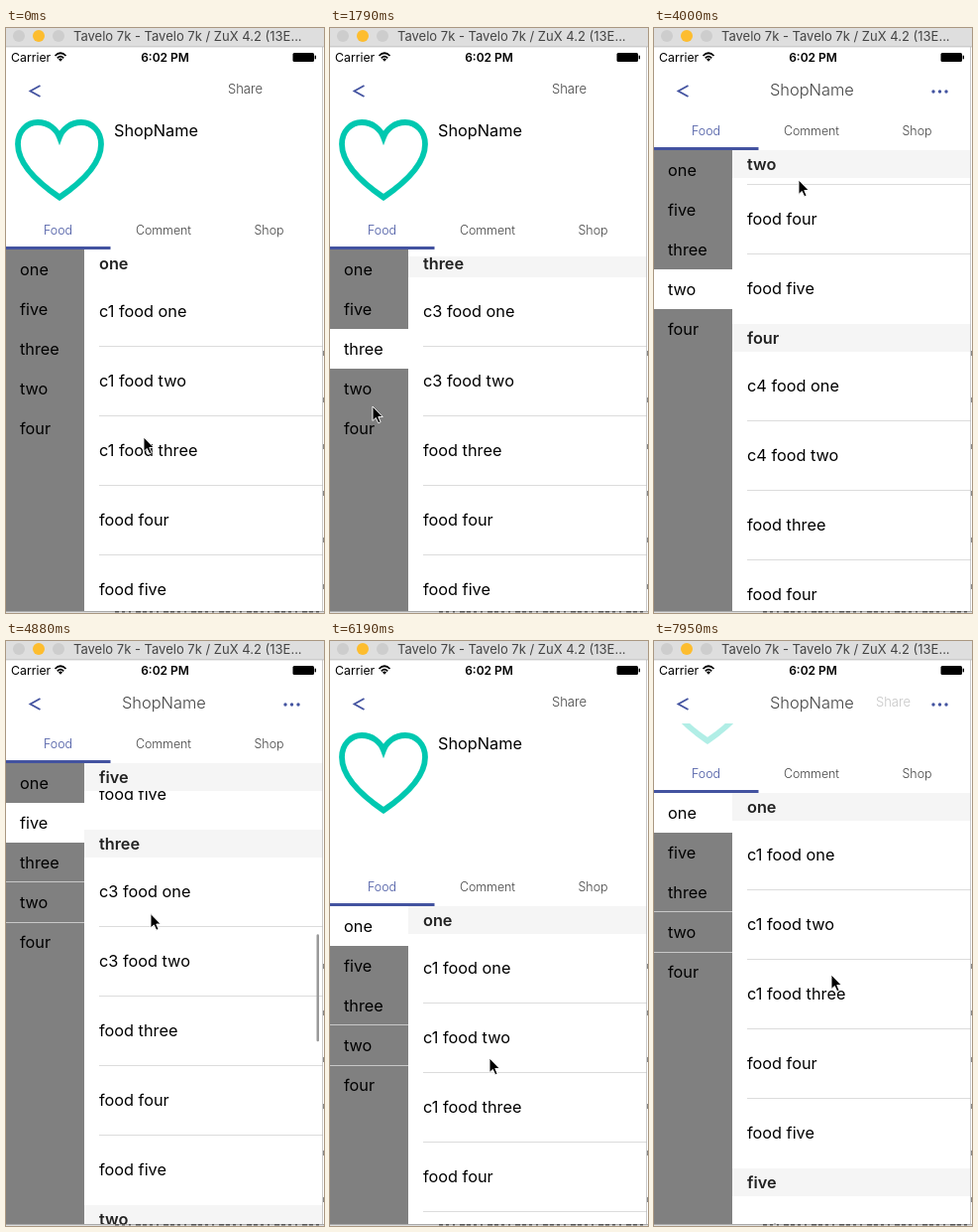
Write an HTML page that moves like this. It is 321 px wide and 589 px high and loops after 8 s.

```html
<!DOCTYPE html>
<html lang="en">
<head>
<meta charset="utf-8">
<title>Shop menu</title>
<style>
html, body { margin: 0; width: 100%; height: 100%; overflow: hidden; background: #fff; }
svg { display: block; font-family: Inter, Roboto, sans-serif; font-size: 16.3px; }
.bold { font-weight: 600; fill: #222; }
.light { font-weight: 300; fill: #444; }
</style>
</head>
<body>
<svg id="stage" width="321" height="589" viewBox="0 0 321 589"></svg>
<script>
const LOOP = 8000, STEP = 147, DRAG_END = 4000, RESUME = 4420;
const SECTION = 378, HEAD = 28, ROW = 70, BOTTOM = 587;
const BLUE = '#4353a0';
const sections = ['one', 'five', 'three', 'two', 'four'];
const words = ['one', 'two', 'three', 'four', 'five'];
const taps = [600, 1480, 1940];

const clamp = (v, lo, hi) => Math.min(hi, Math.max(lo, v));
const smooth = u => u * u * (3 - 2 * u);
const ramp = (t, from, to) => clamp((t - from) / (to - from), 0, 1);

// The screen refreshes in steps and rests between the two drags.
function refreshTime(t) {
  if (t < 150) return 0;
  const base = t < RESUME ? 150 : RESUME;
  const shown = t < RESUME ? Math.min(t, DRAG_END) : t;
  return base + Math.floor((shown - base) / STEP) * STEP;
}

// Position of every moving part at time t
function pose(t) {
  const collapse = ramp(t, 2480, 3480);
  const dragList = ramp(t, 3480, 3970);
  const fling = ramp(t, RESUME, 5320);
  const expand = ramp(t, 5300, 5533);
  const pull = ramp(t, 5550, 6180);
  const release = ramp(t, 6190, 6500);
  const push = ramp(t, 6900, 7940);
  const toMenu = ramp(t, 150, 600);
  const toList = ramp(t, 2200, 2480);
  const bounce = ramp(t, 5320, 5440) - ramp(t, 5450, 5590);

  const jumps = taps.reduce((sum, tap) => sum + smooth(ramp(t, tap, tap + 260)), 0);
  return {
    shift: Math.round(100 * (expand - collapse) + 44 * (pull - release) - 70 * push),
    scroll: Math.round(SECTION * jumps + 203 * dragList - 1337 * smooth(fling) - 4 * bounce),
    x: 139 - 96 * toMenu + 103 * toList + 15 * pull + 18 * push,
    y: 412 - 127 * toMenu + 96 * ramp(t, 1200, 1760) + 69 * toList - 100 * collapse
      - 197 * dragList + 281 * ramp(t, RESUME, 5440) - 14 * pull - 84 * push
  };
}

const rect = (x, y, w, h, fill, more = '') =>
  `<rect x="${x}" y="${y}" width="${w}" height="${h}" fill="${fill}" ${more}/>`;
const dot = (x, y, r, fill) => `<circle cx="${x}" cy="${y}" r="${r}" fill="${fill}"/>`;
const text = (x, y, str, more = '') => `<text x="${x}" y="${y}" ${more}>${str}</text>`;

function rowName(section, i) {
  const prefixed = i < (section === 'one' ? 3 : 2);
  return (prefixed ? `c${words.indexOf(section) + 1} ` : '') + 'food ' + words[i];
}

function selected(t, scroll) {
  if (t >= RESUME) return clamp(Math.floor(scroll / SECTION), 0, 4);
  return taps.filter(tap => tap <= t).length || -1;
}

function list(t, top, scroll) {
  const blank = t < 150 ? HEAD : t < 2350 ? 7 : 0;
  let rows = '', heads = '';
  sections.forEach((name, s) => {
    const y = top + s * SECTION - scroll;
    if (y > BOTTOM || y + SECTION < top) return;
    for (let i = 0; i < 5; i++) {
      const rowY = y + HEAD + i * ROW;
      rows += text(94, rowY + 40, rowName(name, i));
      if (i < 4) rows += rect(94, rowY + ROW - 1, 226, 1, '#dcdcdc');
    }
    const headY = clamp(top, y, y + SECTION - HEAD);
    heads += rect(79, headY, 241, HEAD, '#f5f5f5') + rect(79, top, 241, blank, '#fff')
      + text(94, headY + 20, name, 'class="bold"');
  });
  const barY = top + 3 + Math.max(0, scroll) / (5 * SECTION) * (BOTTOM - top);
  if (t > RESUME && t < 5590) rows += rect(313.5, barY, 2.5, 108, '#999', 'rx="1.25"');
  return `<clipPath id="listBox">${rect(79, top, 241, BOTTOM - top, '#000')}</clipPath>
    <g clip-path="url(#listBox)">${rows}${heads}</g>`;
}

function menu(t, top, sel) {
  let out = rect(0, top, 79, BOTTOM - top, '#808080');
  if (sel >= 0) out += rect(0, top + sel * 40, 79, 40, '#fff');
  if (t >= RESUME && sel < 3) out += rect(0, top + 119, 79, 1, '#c8c8c8') + rect(0, top + 160, 79, 1, '#c8c8c8');
  return out + sections.map((name, i) => text(14, top + 26 + i * 40, name)).join('');
}

function shopInfo(shift, fade) {
  return `<g transform="translate(0 ${Math.min(0, shift)})" opacity="${fade}">
    <path d="M54 170.5C40 161 12 140 12 117C12 104 21 95 32 95C43 95 51 102 54 110
      C57 102 65 95 76 95C87 95 96 104 96 117C96 140 68 161 54 170.5Z"
      fill="none" stroke="#00c8b0" stroke-width="5.8"/>
    ${text(109, 109, 'ShopName')}</g>`;
}

function tabs(top) {
  const label = (x, name, fill) =>
    text(x, top - 15, name, `class="light" font-size="12.4" text-anchor="middle" style="fill:${fill}"`);
  return rect(0, top - 40, 320, 40, '#fff') + label(52.5, 'Food', BLUE) + label(159, 'Comment', '#444')
    + label(265.5, 'Shop', '#444') + rect(0, top - 3, 105.5, 3, BLUE);
}

function navBar(shift, fade) {
  return rect(0, 19, 320, 64, '#fff')
    + `<path d="M34.5 58L24.5 63.5L34.5 69" fill="none" stroke="${BLUE}" stroke-width="1.8"/>`
    + text(224, 66, 'Share', `class="light" font-size="13" opacity="${fade}"`)
    + `<g opacity="${clamp(-shift / 30, 0, 1)}">${text(117, 68, 'ShopName', 'class="light" font-size="16.4"')}
      ${[282, 288.5, 295].map(x => dot(x, 64, 1.7, BLUE)).join('')}</g>`;
}

function statusBar() {
  return text(5, 33.5, 'Carrier', 'font-size="12.3"')
    + text(160.5, 33.5, '6:02 PM', 'font-size="12" font-weight="600" text-anchor="middle"')
    + `<path d="M49.5 28Q55 22.5 60.5 28M51.8 30.3Q55 27 58.2 30.3" fill="none" stroke="#000" stroke-width="1.7"/>
      <path d="M53 31.5Q55 29.7 57 31.5L55 33.7Z"/>`
    + rect(289.5, 25, 21.5, 9, '#000', 'rx="1.5"') + rect(311.6, 27.7, 1.4, 3.6, '#000');
}

function windowFrame() {
  let out = rect(0, 0, 321, 19, '#dedede') + rect(0, 18.5, 321, .8, '#bcbcbc')
    + dot(13, 8, 6, '#cdcdcd') + dot(33, 8, 6, '#fdbd2f') + dot(53, 8, 6, '#cdcdcd')
    + text(68, 12.7, 'Tavelo 7k - Tavelo 7k / ZuX 4.2 (13E...', 'font-size="13" fill="#444"')
    + rect(319.3, 19, .7, 568, '#b5b5b5') + rect(0, BOTTOM, 321, 1, '#aaa') + rect(0, BOTTOM + 1, 321, 1, '#ddd');
  for (let y = 325; y < BOTTOM; y += 47) out += rect(320, y, 1, 5, '#888');
  for (let x = 110; x < 318; x += 7) out += rect(x, BOTTOM, 2 + x % 4, 1.5, '#555');
  return out;
}

const cursor = (x, y) => `<path transform="translate(${x} ${y}) scale(.93)" stroke="#fff"
  d="M0 0V15.5L3.6 12.3L6.2 18L8.7 16.9L6.2 11.3H11Z"/>`;

function draw(t) {
  const { shift, scroll, x, y } = pose(t);
  const top = 223 + shift;
  const fade = clamp(1 + shift / 100, 0, 1);
  stage.innerHTML = shopInfo(shift, fade) + list(t, top, scroll) + menu(t, top, selected(t, scroll))
    + tabs(top) + navBar(shift, fade) + statusBar() + windowFrame() + cursor(x, y);
}

const stage = document.getElementById('stage');
const start = performance.now();
let shown = -1;
function loop() {
  const t = refreshTime((performance.now() - start) % LOOP);
  if (t !== shown) draw(shown = t);
  requestAnimationFrame(loop);
}
loop();
</script>
</body>
</html>
```
